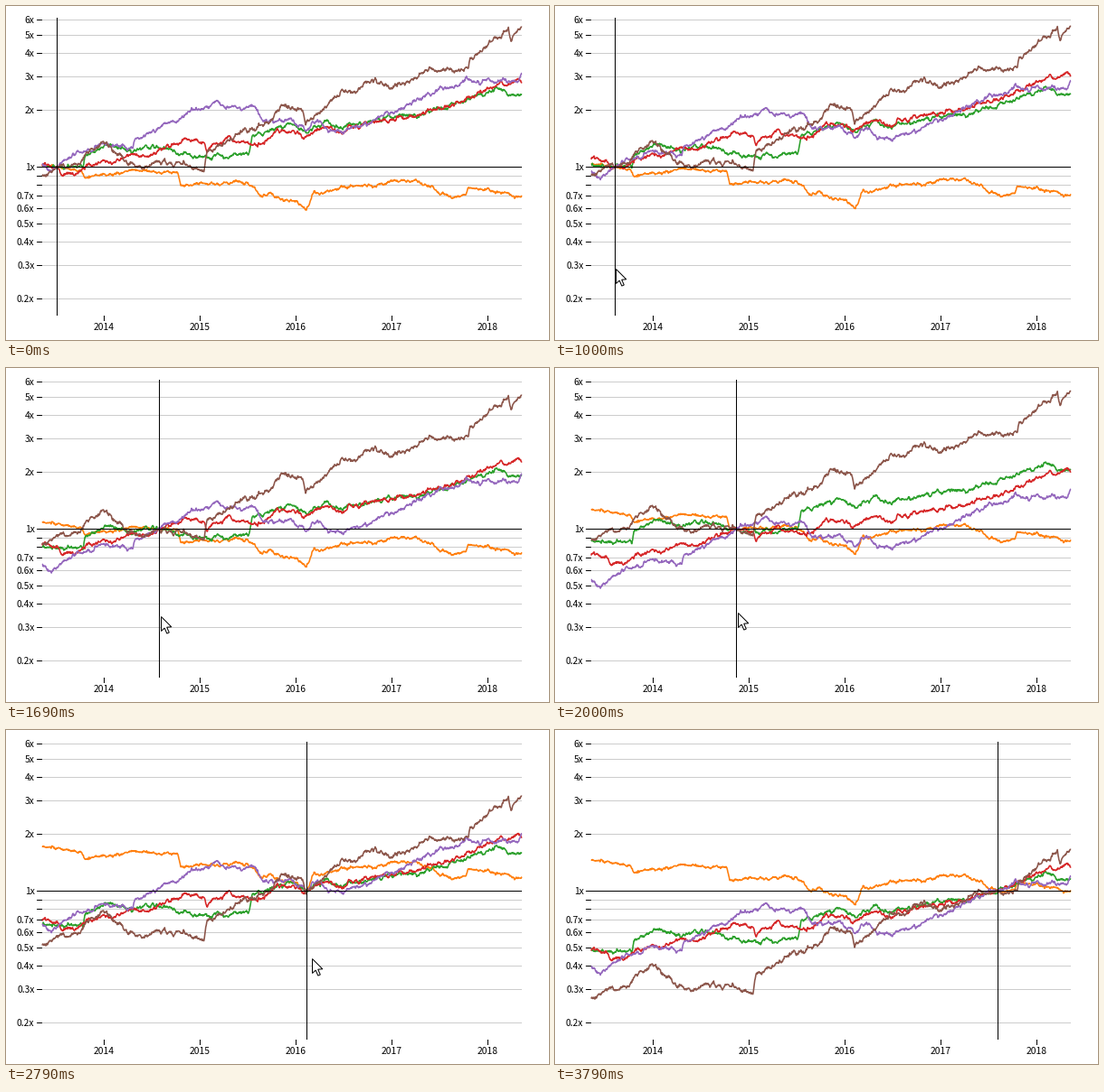
Write a matplotlib script that moves like this. It is 600 by 370 pixels and loops after 4170 ms.

```python
import numpy as np
import matplotlib.pyplot as plt
from matplotlib.animation import FuncAnimation

W, H, DPI = 600, 370, 100
PX = 72 / DPI                      # points per pixel
LEFT, RIGHT, TOP, BOTTOM = 40, 570, 13, 343
BASE, UNIT = 178.5, 90.9           # y of 1x, pixels per e-fold
LOOP, STEP = 4170, 30
START = 56                         # index date before the pointer arrives

# The pointer's journey: time, position of the index line, pointer tip
STOP_T = [600, 1000, 1690, 2320, 2790, 3310, 3790]
STOP_X = [40, 66, 169, 253, 332, 427, 489]
HAND_X = [27, 67, 171, 254, 338, 428, 490]
HAND_Y = [352, 291, 275, 265, 253, 267, 370]

fig = plt.figure(figsize=(W / DPI, H / DPI), dpi=DPI, facecolor="white")
ax = fig.add_axes([0, 0, 1, 1])
ax.set(xlim=(0, W), ylim=(H, 0))
ax.axis("off")


def rule(xs, ys, color="black", z=5):
    return ax.plot(xs, ys, color=color, lw=PX, zorder=z, snap=False,
                   solid_capstyle="butt")[0]


def label(x, baseline, text, align):
    ax.text(x, baseline, text, ha=align, va="baseline", color="black",
            family="Noto Sans CJK JP", size=10.3 * PX)


def draw_axes():
    for v in [k / 10 for k in range(2, 10)] + list(range(1, 7)):
        y = np.floor(BASE - UNIT * np.log(v)) + 0.5
        rule([34, LEFT], [y, y])
        if v == 1:
            rule([LEFT, RIGHT], [y, y])
        else:
            rule([LEFT, RIGHT], [y, y], "#cccccc", 1)
        if v not in (0.8, 0.9):
            label(31.5, y + 3.5, f"{v:g}x", "right")
    for k in range(5):
        x = 108.5 + 106 * k
        rule([x, x], [BOTTOM, BOTTOM + 6])
        label(x, BOTTOM + 16, str(2014 + k), "center")


days = np.linspace(LEFT, RIGHT, 1250)


def jitter(seed, rough, memory=0.9):
    """Mean-reverting daily noise that vanishes at every stop."""
    noise = np.random.default_rng(seed).normal(0, rough, days.size)
    for i in range(1, days.size):
        noise[i] += memory * noise[i - 1]
    pins = sorted([START, RIGHT, *STOP_X])
    return noise - np.interp(days, pins, np.interp(pins, days, noise))


def series(color, seed, rough, *trend):
    """Price curve: straight trends between x, y turning points plus jitter."""
    tx, ty = np.reshape(trend, (-1, 2)).T
    y = np.interp(days, tx, ty) + jitter(seed, rough)
    line, = ax.plot(days, y, color=color, lw=1.6 * PX, zorder=3,
                    solid_joinstyle="round", solid_capstyle="butt")
    return line, y


draw_axes()
curves = [
    series("#ff7f0e", 1, 0.6,
           40, 173, 84, 180, 87, 187, 139, 180, 190, 182, 193, 195, 253, 191,
           272, 195, 281, 206, 310, 211, 332, 223, 341, 206, 375, 199,
           427, 191, 455, 190, 489, 208, 508, 205, 511, 195, 570, 207),
    series("#2ca02c", 2, 0.75,
           40, 177, 85, 180, 87, 167, 113, 155, 143, 162, 169, 157, 216, 167,
           268, 161, 272, 143, 315, 130, 332, 140, 353, 131, 372, 137,
           427, 125, 458, 122, 489, 111, 541, 91, 570, 98),
    series("#d62728", 3, 0.75,
           40, 177, 56, 178, 62, 186, 80, 184, 88, 174, 169, 159, 199, 147,
           219, 149, 222, 160, 246, 148, 281, 157, 300, 138, 332, 144,
           355, 135, 372, 143, 380, 135, 427, 125, 489, 111, 545, 87, 570, 84),
    series("#9467bd", 4, 0.75,
           40, 172, 50, 181, 66, 168, 105, 151, 140, 156, 143, 145, 190, 124,
           229, 107, 275, 109, 283, 123, 315, 125, 332, 136, 344, 123,
           357, 137, 375, 136, 427, 116, 455, 101, 512, 81, 565, 84, 570, 72),
    series("#8c564b", 5, 0.9,
           40, 188, 56, 178, 82, 180, 87, 166, 106, 150, 146, 178, 169, 171,
           219, 179, 222, 160, 253, 144, 290, 130, 306, 103, 328, 112,
           331, 129, 362, 98, 400, 84, 427, 91, 471, 68, 511, 70, 513, 57,
           555, 25, 558, 38, 570, 23),
]
marker = rule([START + 0.5] * 2, [TOP, BOTTOM], z=6)

ARROW = np.array([(0, 0), (0, 16), (3.7, 12.6), (6.3, 18.6), (8.8, 17.5),
                  (6.2, 11.7), (11.3, 11.3)]) + 0.5
cursor, = ax.fill(*ARROW.T, facecolor="white", edgecolor="black",
                  lw=PX, zorder=8, snap=False)

# Bursts of evenly spaced redraws: first, last, count
moments = np.concatenate([np.linspace(*burst) for burst in (
    (600, 1080, 7), (1150, 1620, 7), (1690, 2080, 6),
    (2240, 2700, 7), (2790, 3310, 8), (3380, 3790, 6))])


def update(i):
    t = (i + 0.5) * STEP
    now = max(moments[moments <= t], default=0)
    ref = np.interp(now, STOP_T, STOP_X) if now else START
    for line, y in curves:
        line.set_ydata(y - np.interp(ref, days, y) + BASE)
    marker.set_xdata([np.floor(ref) + 0.5] * 2)
    cursor.set_visible(STOP_T[0] <= now < STOP_T[-1])
    tip = [np.round(np.interp(now, STOP_T, path)) for path in (HAND_X, HAND_Y)]
    cursor.set_xy(ARROW + tip)
    return [line for line, _ in curves] + [marker, cursor]


anim = FuncAnimation(fig, update, frames=LOOP // STEP, interval=STEP,
                     repeat=True, repeat_delay=0, blit=False)
plt.show()
```
